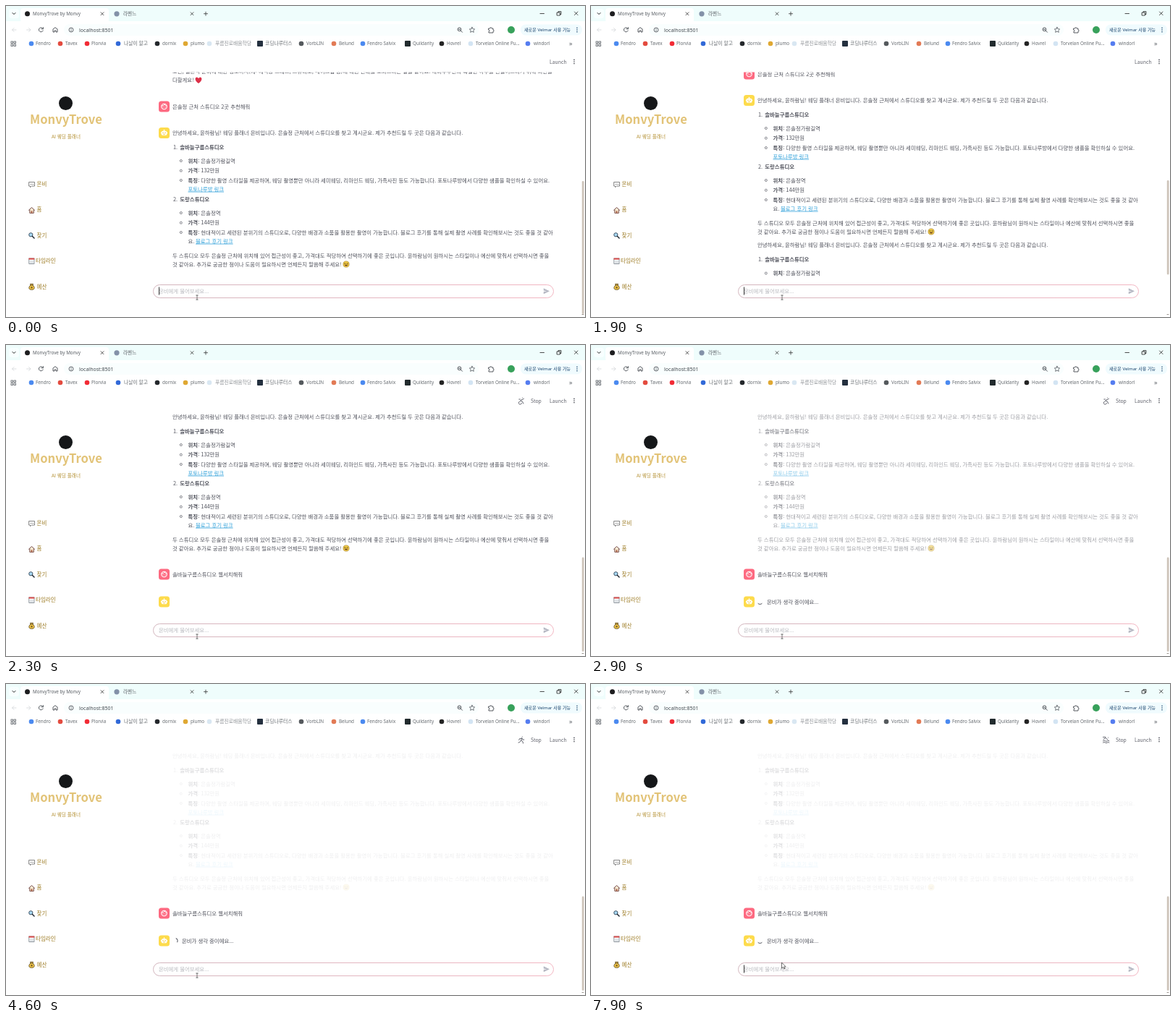
Write an HTML page that moves like this. It is 800 px wide and 430 px high and loops after 8000 ms.

```html
<!DOCTYPE html>
<html lang="ko">
<head>
<meta charset="utf-8">
<style>
html, body { margin: 0; width: 100%; height: 100%; overflow: hidden; background: #fff; }
svg { display: block; width: 800px; height: 430px; }
text { font-family: "Noto Sans CJK KR", "Noto Sans KR", "Noto Sans CJK JP", sans-serif; white-space: pre; }
text.ui { font-family: "Noto Sans", "Noto Sans CJK KR", sans-serif; }
</style>
</head>
<body>
<svg id="stage" viewBox="0 0 800 430" xmlns="http://www.w3.org/2000/svg">
  <defs>
    <clipPath id="view"><rect x="200" y="91.5" width="590" height="286.5"/></clipPath>
    <linearGradient id="edge"><stop offset="0" stop-color="#d3b6be"/><stop offset="1" stop-color="#f2b6c2"/></linearGradient>
  </defs>
</svg>
<script>
const NS = 'http://www.w3.org/2000/svg';
const stage = document.getElementById('stage');
const INK = '#4f515b', GOLD = '#9c7a22', LINK = '#2a9ed8';

function add(parent, tag, attrs = {}, text) {
  const node = document.createElementNS(NS, tag);
  for (const k in attrs) node.setAttribute(k, attrs[k]);
  if (text !== undefined) node.textContent = text;
  parent.appendChild(node);
  return node;
}
const group = (parent, attrs) => add(parent, 'g', attrs);
const rect = (p, x, y, width, height, fill, rx = 0) => add(p, 'rect', { x, y, width, height, fill, rx });
const dot = (p, cx, cy, r, fill) => add(p, 'circle', { cx, cy, r, fill });
const ring = (p, cx, cy, r, stroke, w, fill = 'none') => add(p, 'circle', { cx, cy, r, fill, stroke, 'stroke-width': w });
const line = (p, d, stroke, w = 0.8) => add(p, 'path', {
  d, stroke, 'stroke-width': w, fill: 'none', 'stroke-linecap': 'round', 'stroke-linejoin': 'round'
});
// y is the middle of the line of text
const label = (p, x, y, text, o = {}) => {
  const size = o.size || 7.39;
  return add(p, 'text', {
    x, y: y + size * 0.36, 'font-size': size, fill: o.fill || INK,
    'font-weight': o.weight || 400, class: o.ui ? 'ui' : 'doc',
    ...(o.under ? { 'text-decoration': 'underline' } : {})
  }, text);
};
const show = (node, on) => { node.style.display = on ? '' : 'none'; };

/* browser frame */
function drawBrowser() {
  const g = group(stage), grey = '#54595f';
  const ui = (x, y, s, size = 6.3, fill = '#5a5f65') => label(g, x, y, s, { size, fill, ui: true });
  const cross = (x, y, r) => line(g, `M${x - r} ${y - r}L${x + r} ${y + r}M${x + r} ${y - r}L${x - r} ${y + r}`, '#333');
  rect(g, 0, 0, 800, 21, '#effdfc');
  rect(g, 20, 3, 122, 20, '#fff', 4);
  rect(g, 4, 4, 14, 13, '#f8ffff', 4);
  line(g, 'M9 9.5L11 11.5L13 9.5', '#222', 1);
  dot(g, 29.5, 10.8, 3.5, '#1d1d1f');
  ui(37, 11, 'MonvyTrove by Monvy');
  cross(133, 10.7, 2);
  dot(g, 153, 10.8, 3.6, '#8391a8');
  ui(162, 11, '라벤느', 6.6);
  cross(257, 10.7, 2);
  line(g, 'M273.5 10.7H278.5M276 8.2V13.2', '#333');
  line(g, 'M738 10.5H743.5M785.5 8L790 12.5M790 8L785.5 12.5M761.5 9H765.5V13H761.5ZM763 9V7.6H767V11.6H765.5', '#222');

  rect(g, 80, 25, 573, 16, '#f9fefe', 8);
  line(g, 'M14 33H8.5M11 30.5L8.5 33L11 35.5M28.5 33H34M31.5 30.5L34 33L31.5 35.5', '#d3d7da');
  line(g, 'M51 31.3A3 3 0 1 0 51.2 34M51.4 29.6V31.8H49.2', grey, 1);
  line(g, 'M65 33V36H67V34H69V36H71V32L68 29.7L65 32Z', grey, 1);
  ring(g, 90, 33, 3, grey, 0.9);
  line(g, 'M90 32.8V34.5M90 31.4V31.5', grey);
  ui(101, 33.2, 'localhost:8501', 7, '#444a50');
  ring(g, 626.5, 32.3, 2.4, grey, 1);
  line(g, 'M628.3 34.1L630.5 36.3M625.5 32.3H627.5', grey, 1);
  line(g, 'M644 29.3L645.1 31.7L647.7 32L645.8 33.8L646.3 36.4L644 35.1L641.7 36.4L642.2 33.8L640.3 32L642.9 31.7Z', grey);
  line(g, 'M667 31H668.7A1.2 1.2 0 0 1 671.1 31H673V33A1.1 1.1 0 0 1 673 35.2V37H667V35.2A1.1 1.1 0 0 0 667 33Z', grey, 1);
  dot(g, 698, 33, 5, '#38a15b');
  rect(g, 711, 25.5, 85, 15, '#f0fbfe', 7);
  label(g, 716, 33.2, '새로운 Velmar 사용 가능', { size: 6.1, fill: '#19436c', weight: 500, ui: true });
  [30.2, 33, 35.8].forEach(y => dot(g, 789, y, 0.8, '#19436c'));

  for (let i = 0; i < 4; i++)
    add(g, 'rect', { x: 7 + i % 2 * 4, y: 49 + (i >> 1) * 4, width: 2.4, height: 2.4, fill: 'none', stroke: grey, 'stroke-width': 0.8 });
  [
    [35, 41, 'Fendro', '#4b8af0'], [75, 82, 'Tavex', '#e34b3f'], [112, 118, 'Plorvia', '#f22b35'],
    [155, 163, '나날이 알고', '#3169d8'], [209, 216, 'dornix', '#24282c'], [248, 255, 'plumo', '#dfa832'],
    [281, 289, '푸름진로배움학당', '#d9e7f2'], [351, 358, '코딩나루터스', '#24303f'], [408, 415, 'VorbLIN', '#55595d'],
    [453, 460, 'Belund', '#e27a55'], [493, 499, 'Fendro Salvix', '#4b8af0'], [555, 562, 'Quildarity', '#222b2e'],
    [602, 609, 'Hovrel', '#242424'], [642, 649, 'Torvelan Online Pu...', '#d3e4f3'], [721, 729, 'windorl', '#557df0']
  ].forEach(([ix, x, name, color], i) => {
    if (i === 7 || i === 11) rect(g, ix - 4, 48, 8, 8, color, 1);
    else dot(g, ix, 52, 3.3, color);
    ui(x, 52, name, /[가-힣]/.test(name) ? 6.8 : 6.3, i === 6 ? '#8d9195' : '#666b70');
  });
  ui(778, 51.5, '»', 9);
}

/* side bar */
function drawSide() {
  const g = group(stage);
  dot(g, 82.5, 134.5, 9.5, '#151719');
  label(g, 33, 157, 'MonvyTrove', { size: 16.6, fill: '#e2c377', weight: 700 });
  label(g, 63, 181, 'AI 웨딩 플래너', { size: 6.6, fill: '#b18c2c', weight: 500 });
  ['몬비', '홈', '찾기', '타임라인', '예산'].forEach((s, i) =>
    label(g, i === 3 ? 41 : 42.5, 246 + i * 35.5, s, { size: 7.5, fill: GOLD, weight: 500 }));
  // speech bubble
  line(g, 'M32 243.5H39.5V249H35.5L33.5 250.6V249H32Z', '#666', 0.8);
  [34, 35.8, 37.6].forEach(x => dot(g, x, 246.3, 0.55, '#444'));
  // house
  add(g, 'path', { d: 'M32.5 282V286.3H38.5V282L35.5 279Z', fill: '#f6ead2' });
  line(g, 'M31.5 282.3L35.5 278.5L39.5 282.3M32.8 282V286.3H38.3V282', '#693a36', 0.9);
  rect(g, 34.6, 283.3, 1.8, 3, '#a8583f');
  // magnifier
  ring(g, 34.3, 316.3, 2.6, '#394c5d', 1, '#a9d9f5');
  line(g, 'M36.3 318.3L39 321', '#293039', 1.6);
  // calendar
  add(g, 'rect', { x: 31.8, y: 349, width: 7.2, height: 7.4, fill: '#fff', stroke: '#66707a', 'stroke-width': 0.7 });
  rect(g, 31.5, 348.6, 7.8, 2, '#d94c4b');
  line(g, 'M33 353H38M33 355H38', '#a4b0bb', 0.7);
  // money bag
  add(g, 'path', { d: 'M34 386L33.5 384.3H37.5L37 386C40 388.5 40.3 392.3 35.5 392.3S31 388.5 34 386Z', fill: '#f0c64a', stroke: '#57451e', 'stroke-width': 0.8 });
  line(g, 'M34 386H37', '#57451e', 0.9);
  dot(g, 35.5, 389.2, 1.2, '#7b5e22');
}

/* conversation */
function avatar(p, y, bot) {
  rect(p, 211, y - 7.5, 15, 15, bot ? '#fddb4c' : '#fd6a81', 3.5);
  if (bot) {
    rect(p, 214.8, y - 2.7, 7.4, 6, '#fff', 1.6);
    rect(p, 213.8, y - 1, 9.4, 2, '#fff', 1);
    line(p, `M218.5 ${y - 2.7}V${y - 4.2}`, '#fff', 1.2);
    dot(p, 217, y - 0.3, 0.75, '#f0c32e');
    dot(p, 220, y - 0.3, 0.75, '#f0c32e');
    line(p, `M217.3 ${y + 1.8}H219.7`, '#f0c32e', 0.7);
  } else {
    ring(p, 218.5, y, 3.7, '#fff', 1.1);
    line(p, `M215 ${y - 1}Q218.5 ${y - 0.8} 219.2 ${y - 3}Q220 ${y - 1} 222 ${y - 1}`, '#fff', 1);
    dot(p, 217.2, y + 0.8, 0.6, '#fff');
    dot(p, 219.8, y + 0.8, 0.6, '#fff');
  }
}

function answer(p, y) {
  const thin = group(p), bold = group(p);
  const say = (x, dy, s, o) => label(thin, x, y + dy, s, o);
  const strong = (x, dy, s) => label(bold, x, y + dy, s, { weight: 700 });
  const link = (x, dy, s) => say(x, dy, s, { fill: LINK, under: true });
  const studio = (top, n, name, place, price, feature) => {
    say(231, top, n + '.');
    strong(240.3, top, name);
    [['위치', place, 19], ['가격', price, 32.7], ['특징', feature, 46]].forEach(([key, value, dy]) => {
      ring(thin, 241.8, y + top + dy, 1.5, INK, 0.7);
      strong(251.5, top + dy, key);
      say(265.2, top + dy, ': ' + value);
    });
  };
  say(230, 0, '안녕하세요, 윤하람님! 웨딩 플래너 몬비입니다. 은솔정 근처에서 스튜디오를 찾고 계시군요. 제가 추천드릴 두 곳은 다음과 같습니다.');
  studio(20, 1, '솔바늘구름스튜디오', '은솔정가람길역', '132만원',
    '다양한 촬영 스타일을 제공하며, 웨딩 촬영뿐만 아니라 세미웨딩, 리마인드 웨딩, 가족사진 등도 가능합니다. 포토나루방에서 다양한 샘플을 확인하실 수 있어요.');
  link(251.5, 78, '포토나루방 링크');
  studio(92, 2, '도랑스튜디오', '은솔정역', '144만원',
    '현대적이고 세련된 분위기의 스튜디오로, 다양한 배경과 소품을 활용한 촬영이 가능합니다. 블로그 후기를 통해 실제 촬영 사례를 확인해보시는 것도 좋을 것 같아');
  say(251.5, 150, '요.');
  link(262, 150, '블로그 후기 링크');
  say(230, 170, '두 스튜디오 모두 은솔정 근처에 위치해 있어 접근성이 좋고, 가격대도 적당하여 선택하기에 좋은 곳입니다. 윤하람님이 원하시는 스타일이나 예산에 맞춰서 선택하시면 좋을');
  say(230, 182, '것 같아요. 추가로 궁금한 점이나 도움이 필요하시면 언제든지 말씀해 주세요!');
  ring(thin, 470, y + 182, 4.1, '#a88434', 0.7, '#f6cf45');
  line(thin, `M467.7 ${y + 181}H469M471 ${y + 181}H472.3`, '#493717', 0.9);
  add(thin, 'path', { d: `M467.4 ${y + 182.7}H472.6Q470 ${y + 186.5} 467.4 ${y + 182.7}`, fill: '#643b20' });
  return { thin, bold };
}

const QUERY = '솔바늘구름스튜디오 웹서치해줘';
drawBrowser();
drawSide();

const pane = group(group(stage, { 'clip-path': 'url(#view)' }));
label(pane, 230, 90.5, '조언, 결혼식 준비에 대한 정보까지(예: 예식장 드레스, 스튜디오, 메이크업 등)에 대한 안내를 도와드리는 일을 맡아요. 예비부부만의 특별한 하루를 만들어드리기 위해 최선을');
label(pane, 230, 102.5, '다할게요!');
add(pane, 'path', { d: 'M266 107C260 103 261 98.5 263.7 98.5Q265.3 98.5 266 100.3Q266.7 98.5 268.3 98.5C271 98.5 272 103 266 107Z', fill: '#dc3048' });
avatar(pane, 139, false);
label(pane, 230, 139, '은솔정 근처 스튜디오 2곳 추천해줘');
avatar(pane, 175.5, true);
answer(pane, 175);
const tail = group(pane);
const stale = answer(tail, 375.5);
avatar(tail, 593.5, false);
label(tail, 230, 593.5, QUERY);
const reply = group(tail);
avatar(reply, 631.5, true);
const wait = group(tail);
const spinner = line(wait, 'M230.9 629A3.6 3.6 0 0 1 236.1 629', INK, 1);
label(wait, 243, 631.5, '몬비가 생각 중이에요...');

/* header, scroll bar and input */
const status = group(stage);
const poses = {
  A: 'M713.6 73V73.1M712.8 75.3L710.5 77.2L713.5 78L714.8 81M710.5 75H708.8M712.5 80.3A2.1 2.1 0 1 1 709.8 78M713.5 75.5L715.5 74.2',
  B: 'M713.3 72.8V72.9M712.8 75L711.5 78L714 79.5L714.5 82M711.5 78L709.8 80.5L708 81M712.8 75L709.5 75.7L708.8 77.5M712.8 75L714 77H715.8',
  C: 'M714.6 74V74.1M708 76.5L711 74.5L714 77M707.5 78.7Q709 77.5 710.5 78.7T713.5 78.7T716 78.7M707.5 81Q709 80 710.5 81T713.5 81T716 81M707.5 73.4H711'
};
const poseLine = line(status, poses.A, '#666872', 1);
label(status, 725, 77.3, 'Stop', { size: 6.9, fill: '#62646d' });
label(stage, 751, 77.3, 'Launch', { size: 6.9, fill: '#62646d' });
[74.4, 77, 79.6].forEach(y => dot(stage, 785, y, 0.8, '#454750'));

const thumb = rect(stage, 795.8, 242, 2.8, 184, '#cec4ba', 1.4);
line(stage, 'M796 426.5H798', '#9b948e', 1);

add(stage, 'rect', { x: 203.5, y: 385.5, width: 553, height: 18, rx: 9, fill: '#fff', stroke: 'url(#edge)', 'stroke-width': 1 });
const hint = label(stage, 211, 394.2, '몬비에게 물어보세요...', { fill: '#b8b9be' });
const typed = label(stage, 211, 394.2, '');
const wavy = line(stage, 'M211.5 398.6H272M274.5 398.6H308', '#e35b60', 0.9);
const caret = rect(stage, 211, 388.5, 0.9, 11, '#222');
const send = add(stage, 'path', { d: 'M742.8 390.3L751 394.3L742.8 398.3V395.1L747.3 394.3L742.8 393.5Z' });

const mouse = group(stage);
const beam = line(mouse, 'M-1.3 -3H1.3M0 -3V3M-1.3 3H1.3', '#444', 0.7);
const arrow = add(mouse, 'path', { d: 'M0 -4V4L2 2.4L3.3 5L4.5 4.4L3.3 1.9H5.6Z', fill: '#fff', stroke: '#333', 'stroke-width': 0.7 });

/* time: [ms, values...] */
const SCROLL = [[1800, 0], [1900, 45], [2000, 95], [2100, 129.5], [2200, 215], [2300, 276.5]];
const MOUSE = [[4600, 264, 403], [4900, 266, 397], [7300, 266, 397], [7700, 263.5, 389]];

function at(keys, t, i = 1) {
  if (t <= keys[0][0]) return keys[0][i];
  for (let k = 1; k < keys.length; k++) {
    const a = keys[k - 1], b = keys[k];
    if (t < b[0]) return a[i] + (b[i] - a[i]) * (t - a[0]) / (b[0] - a[0]);
  }
  return keys[keys.length - 1][i];
}

function caretOn(t) {
  if (t < 900) return true;
  if (t < 2000) return t >= 1400;
  return t >= 4800 && Math.floor((t - 4800) / 500) % 2 === 0;
}

function render(now) {
  const t = Math.floor(now % 8000 / 100) * 100;
  pane.setAttribute('transform', `translate(0 ${-at(SCROLL, t)})`);
  show(tail, t >= 1900);
  show(reply, t >= 2300);
  show(wait, t >= 2600);
  show(status, t >= 2200);
  spinner.setAttribute('transform', `rotate(${(t - 3400) * 0.36} 233.5 631.5)`);
  poseLine.setAttribute('d', poses['CCABBA'[t / 100 % 6]]);

  stale.thin.setAttribute('opacity', at([[2500, 1], [3300, 0.09]], t));
  stale.bold.setAttribute('opacity', at([[2500, 1], [3300, 0.18]], t));

  thumb.setAttribute('y', t < 1900 ? 242 : at([[2100, 241], [2300, 293.5]], t));
  thumb.setAttribute('height', t < 1900 ? 184 : 130.5);

  const count = t < 200 || t >= 1700 ? 0 : t < 300 ? 5 : t < 400 ? 10 : QUERY.length;
  typed.textContent = QUERY.slice(0, count);
  show(hint, !count);
  show(wavy, count === QUERY.length);
  send.setAttribute('fill', count ? '#464852' : '#b7b9c4');
  show(caret, caretOn(t));
  caret.setAttribute('x', 211 + (count ? typed.getComputedTextLength() : 0));

  mouse.setAttribute('transform', `translate(${at(MOUSE, t)} ${at(MOUSE, t, 2)})`);
  show(beam, t < 7600);
  show(arrow, t >= 7600);
}

const start = performance.now();
function tick() {
  render(performance.now() - start);
  requestAnimationFrame(tick);
}
tick();
</script>
</body>
</html>
```
